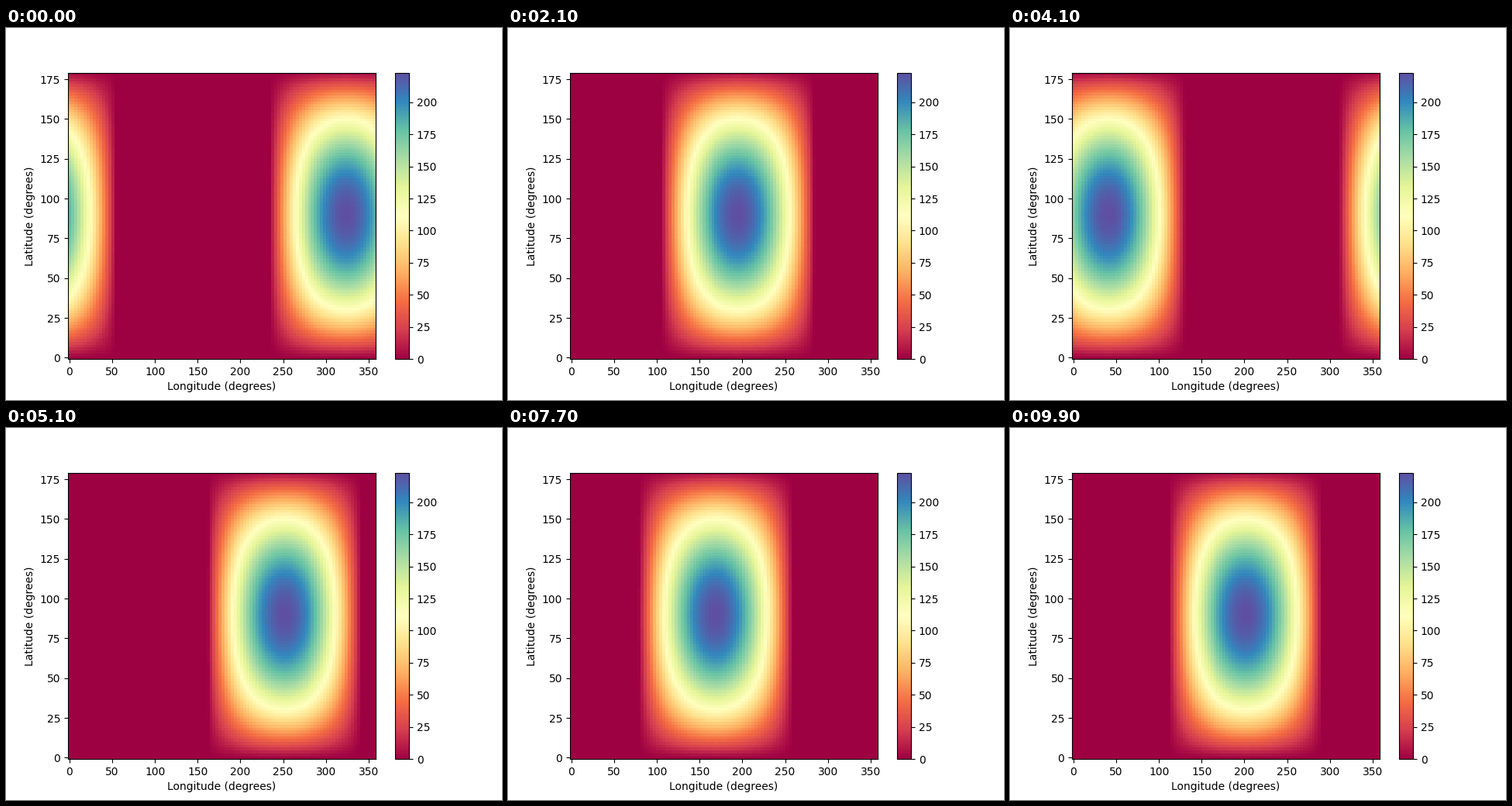
Write a matplotlib script that moves like this. It is 640 px wide and 480 px high and loops after 10000 ms.

```python
import numpy as np
import matplotlib.pyplot as plt
from matplotlib.animation import FuncAnimation

FRAMES = 100
INTERVAL = 100
PEAK = 223.0

ECC = 0.329          # orbital eccentricity
ORBITS = 1.5         # orbits per loop
CLOSEST = 35.72      # step of the closest approach
NOON_THERE = 219.0   # noon longitude at that step
SPIN = 3.29          # turns of the noon point per orbit

lon = np.linspace(0, 360, 100, endpoint=False)
lat = np.linspace(0, 180, 100, endpoint=False)


def true_anomaly(mean):
    """Unwrapped orbital angle, from Kepler's equation by Newton's method."""
    ecc_anom = mean
    for _ in range(20):
        miss = ecc_anom - ECC * np.sin(ecc_anom) - mean
        ecc_anom -= miss / (1 - ECC * np.cos(ecc_anom))
    beta = ECC / (1 + np.sqrt(1 - ECC ** 2))
    return ecc_anom + 2 * np.arctan2(beta * np.sin(ecc_anom),
                                     1 - beta * np.cos(ecc_anom))


def noon(step):
    mean = 2 * np.pi * ORBITS * (step - CLOSEST) / FRAMES
    return NOON_THERE + SPIN * np.degrees(true_anomaly(mean))


def flux(step):
    day = np.clip(np.cos(np.radians(lon - noon(step))), 0, None)
    return PEAK * np.outer(np.sin(np.radians(lat)), day)


fig, ax = plt.subplots(figsize=(6.4, 4.8), dpi=100)
mesh = ax.pcolormesh(lon, lat, flux(0), cmap="Spectral",
                     vmin=0, vmax=PEAK, shading="nearest")
fig.colorbar(mesh, ax=ax)
ax.set_xlabel("Longitude (degrees)")
ax.set_ylabel("Latitude (degrees)")


def update(step):
    mesh.set_array(flux(step))
    return (mesh,)


anim = FuncAnimation(fig, update, frames=FRAMES, interval=INTERVAL,
                     repeat=True, repeat_delay=0, blit=False)
plt.show()
```
